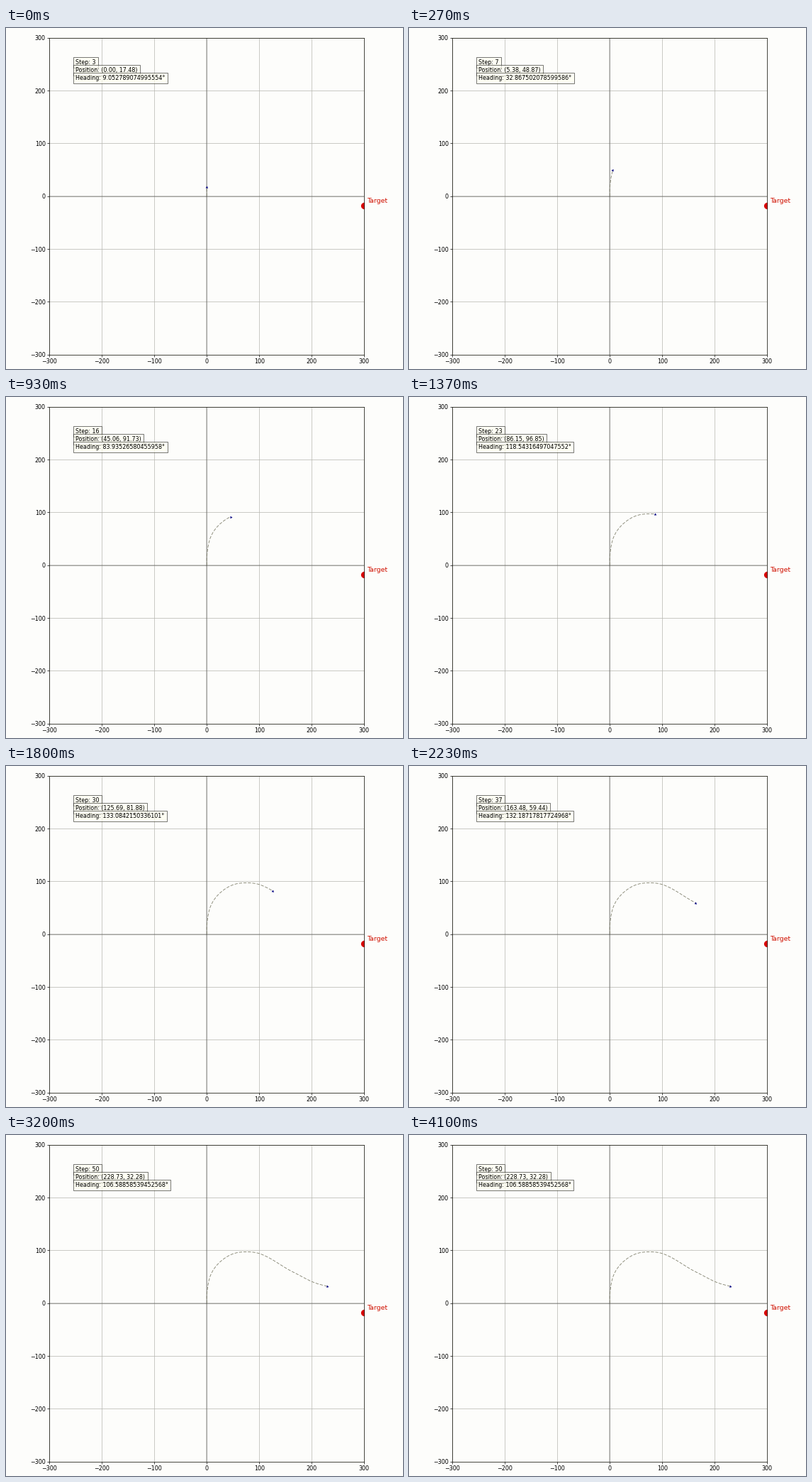
A matplotlib script that plays this animation: 560x480 px, repeating every 4230 ms.

```python
import numpy as np
import matplotlib.pyplot as plt
from matplotlib.animation import FuncAnimation

W, H, DPI = 560, 480, 64
LOOP, INTERVAL = 4230, 30
LIMIT, LAST_STEP = 300, 50
TARGET = (300, -18)
STALL = (1130, 1270)
PAPER, INK, GRID = "#fdfdfb", "#1c1c14", "#b6b6b0"

plt.rcParams.update({
    "font.family": "DejaVu Sans", "font.size": 9, "toolbar": "None",
    "xtick.major.size": 3.15, "ytick.major.size": 3.15,
    "xtick.major.pad": 3.15, "ytick.major.pad": 3.15,
    "xtick.major.width": 0.8, "ytick.major.width": 0.8,
})

# Waypoints of the run: step, x, y, compass heading
WAYPOINTS = np.array([
    (0, 0, 0, 0),
    (3, 0, 17.48, 9.052789074995554),
    (7, 5.38, 48.87, 32.867502078599586),
    (16, 45.06, 91.73, 83.93526580455958),
    (23, 86.15, 96.85, 118.54316497047552),
    (37, 163.48, 59.44, 132.18717817724968),
    (46, 209.24, 37.40, 114.86736206484976),
    (LAST_STEP, 228.73, 32.28, 106.58858539452568)])


def glide(knots, values, s):
    """Smooth curve through the knots with finite-difference slopes."""
    slope = np.gradient(values, knots)
    i = np.clip(np.searchsorted(knots, s, side="right") - 1, 0, len(knots) - 2)
    h = knots[i + 1] - knots[i]
    u = (s - knots[i]) / h
    return (values[i] * (2 * u**3 - 3 * u**2 + 1)
            + values[i + 1] * (3 * u**2 - 2 * u**3)
            + h * slope[i] * (u**3 - 2 * u**2 + u)
            + h * slope[i + 1] * (u**3 - u**2))


def step_at(t):
    """About 15 steps a second, slightly uneven, with one short stall."""
    if STALL[0] < t < STALL[1]:
        t = STALL[0]
    s = 3.45 + t / 67 - 0.7 * np.sin(2 * np.pi * t / 2870)
    return min(int(s), LAST_STEP)


steps = np.arange(LAST_STEP + 1)
xs, ys, headings = (glide(WAYPOINTS[:, 0], column, steps)
                    for column in WAYPOINTS.T[1:])

fig = plt.figure(figsize=(W / DPI, H / DPI), dpi=DPI, facecolor=PAPER)
ax = fig.add_axes((61.4 / W, 1 - 459.8 / H, 444 / W, 446 / H), facecolor=PAPER)
ax.set(xlim=(-LIMIT, LIMIT), ylim=(-LIMIT, LIMIT))
ticks = range(-LIMIT, LIMIT + 1, 100)
ax.set_xticks(ticks)
ax.set_yticks(ticks)
ax.grid(True, color=GRID, linewidth=0.8)
ax.axhline(0, color="black", linewidth=0.45)
ax.axvline(0, color="black", linewidth=0.45)
for spine in ax.spines.values():
    spine.set_linewidth(0.9)
    spine.set_color(INK)

ax.plot(*TARGET, "o", color="#d80000", markersize=10.4, markeredgewidth=0)
ax.text(TARGET[0] + 5, TARGET[1] + 5, "Target", color="#d01000", fontsize=10.6)

trail, = ax.plot([], [], color="#80806c", linewidth=0.95, dashes=(5, 2.4))
boat, = ax.plot([], [], color="#000080", markersize=4.5, markeredgewidth=0,
                linestyle="none")


def label(y):
    box = dict(facecolor="#fffff0", edgecolor="black", alpha=0.65,
               linewidth=0.9, pad=3.6)
    return ax.text(-250, y, "", color="black", bbox=box)


step_text, pos_text, head_text = (label(y) for y in (250, 235, 220))


def draw(i):
    n = step_at(i * INTERVAL)
    x, y, heading = xs[n], ys[n], float(headings[n])
    trail.set_data(xs[:n + 1], ys[:n + 1])
    boat.set_data([x], [y])
    boat.set_marker((3, 0, -heading))
    step_text.set_text(f"Step: {n}")
    pos_text.set_text(f"Position: ({x:.2f}, {y:.2f})")
    head_text.set_text(f"Heading: {heading}°")
    return trail, boat, step_text, pos_text, head_text


anim = FuncAnimation(fig, draw, frames=LOOP // INTERVAL, interval=INTERVAL,
                     init_func=lambda: draw(0), repeat=True, repeat_delay=0)
plt.show()
```
